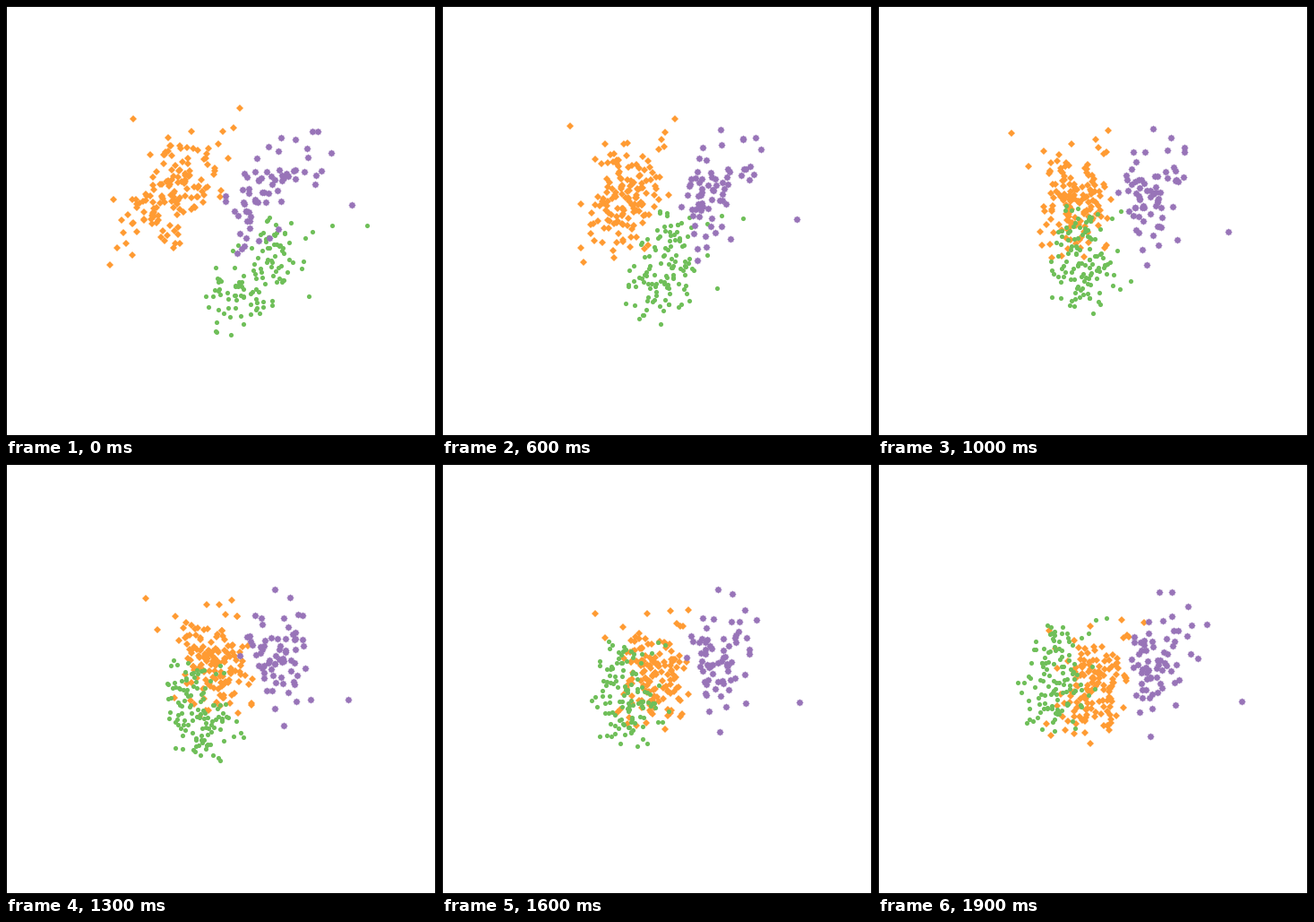
Animation, 480 px wide and 480 px high, one loop 2 s. Source, as a matplotlib script:

```python
import numpy as np
import matplotlib.pyplot as plt
from matplotlib.animation import FuncAnimation
from matplotlib.path import Path

SIZE, FRAMES, TURN = 480, 20, 13
HALF = 4.205                      # half width of the view, in standard deviations

# Projection planes visited by the tour: weights of four variables on x and y
PLANES = [
    np.eye(4, 2),
    np.array([[.7018, -.070, -.2025, -.6726], [-.0575, .823, .493, -.289]]).T,
    np.array([[.7586, .2266, -.438, -.4255], [.090, .645, .705, -.205]]).T,
]
SHIFT = np.array([.33, .39, .22, .40])   # half the step between the two halves of a group

rng = np.random.default_rng(5)


def group(n, center, sd, *extremes):
    """Two correlated normal halves around a centre, plus a few far points."""
    noise = rng.normal(size=(4 * n, 5))
    noise = .88 * noise[:, :4] + .47 * noise[:, 4:]
    noise = noise[np.abs(noise).max(axis=1) < 2.2][:n]
    side = np.where(np.arange(n) % 2, 1, -1)[:, None]
    return np.vstack([center + side * SHIFT + sd * noise, extremes])


def geodesic(a, b, s):
    """Turn plane a into plane b along their principal angles."""
    m = a.T @ b
    cos, v = np.linalg.eigh((m + m.T) / 2)
    ang = np.arccos(np.clip(cos, -1, .9999))
    mix = a @ v * np.sin((1 - s) * ang) + b @ v * np.sin(s * ang)
    return mix / np.sin(ang) @ v.T


def plane(i):
    if i <= TURN:
        return geodesic(PLANES[0], PLANES[1], i / TURN)
    return geodesic(PLANES[1], PLANES[2], (i - TURN) / (FRAMES - 1 - TURN))


def rosette(points=8, dent=.78):
    """Disc with a notched rim."""
    k = np.arange(2 * points + 1)
    r = np.where(k % 2, dent, 1)
    a = np.pi * k / points
    return Path(np.column_stack([r * np.cos(a), r * np.sin(a)]), closed=True)


fig = plt.figure(figsize=(SIZE / 100, SIZE / 100), dpi=100, facecolor="black")
inset = 1 / SIZE                  # leaves a one pixel black border
ax = fig.add_axes([inset, inset, 1 - 2 * inset, 1 - 2 * inset])
lim = HALF * (1 - 2 * inset)
ax.set(xlim=(-lim, lim), ylim=(-lim, lim), xticks=[], yticks=[])
ax.spines[:].set_visible(False)


def cloud(marker, size, color):
    return ax.plot([], [], ls="", marker=marker, ms=size, color=color, mew=0)[0]


layers = [
    (group(143, (-.94, .60, -.77, -.62), .41,
           (.37, 2.20, -.50, -.01), (-1.72, 2.00, -.21, .24), (-2.17, -.85, -.93, -1.44)),
     cloud("D", 4.3, "#ff9b33")),
    (group(117, (.65, -1.10, 1.18, 1.09), .37,
           (2.85, -.08, 2.07, 2.29), (2.18, -.08, 1.93, 1.73)),
     cloud("o", 3.7, "#6fbf59")),
    (group(66, (.88, .64, -.37, -.59), .40,
           (2.56, .32, -1.43, -.63), (2.16, 1.34, .43, -.26)),
     cloud(rosette(), 5.8, "#9874b8")),
]


def draw(i):
    p = plane(i)
    for pts, dots in layers:
        dots.set_data(*(pts @ p).T)
    return [dots for _, dots in layers]


anim = FuncAnimation(fig, draw, frames=FRAMES, interval=100, repeat=True,
                     repeat_delay=0, init_func=lambda: draw(0))
plt.show()
```
